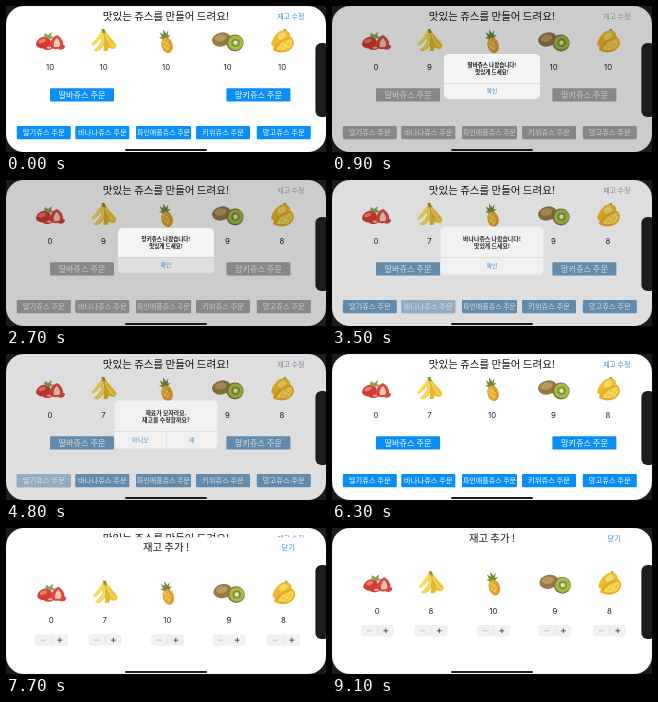
An HTML page with a canvas that plays this animation: 320x146 px, repeating every 9.2 s.

```html
<!DOCTYPE html>
<html lang="ko">
<head>
<meta charset="utf-8">
<style>
html, body { margin: 0; width: 100%; height: 100%; overflow: hidden; background: #fff; }
canvas { display: block; width: 100%; height: 100%; }
</style>
</head>
<body>
<canvas></canvas>
<script>
const W = 320, H = 146, LOOP = 9200, STEP = 100;
const canvas = document.querySelector('canvas');
const ctx = canvas.getContext('2d');
const ratio = window.devicePixelRatio || 1;
canvas.width = W * ratio;
canvas.height = H * ratio;

const FONT = '"Noto Sans CJK KR", "Noto Sans CJK", "Noto Sans", sans-serif';
const DIGITS = 'Inter, sans-serif';
const BLUE = [8, 142, 250], LINK = [64, 140, 205], GREY = [168, 168, 168];
const BUTTON_H = 13.3;
const COLUMNS = [44, 97.5, 160, 221.5, 276];
const BUTTONS = [
  { name: '딸바쥬스', x: 44, y: 82.3, w: 64, size: 8.2 },
  { name: '망키쥬스', x: 220.4, y: 82.3, w: 64, size: 8.2 },
  { name: '딸기쥬스', x: 10.8, y: 119.9, w: 54, size: 7.3 },
  { name: '바나나쥬스', x: 69.3, y: 119.9, w: 54, size: 7.3 },
  { name: '파인애플쥬스', x: 130, y: 119.9, w: 55, size: 7 },
  { name: '키위쥬스', x: 190, y: 119.9, w: 54, size: 7.3 },
  { name: '망고쥬스', x: 250.8, y: 119.9, w: 54, size: 7.3 }
];

const served = name => ({ lines: [name + ' 나왔습니다!', '맛있게 드세요!'], choices: ['확인'] });
const lacking = { lines: ['재료가 모자라요.', '재고를 수정할까요?'], choices: ['아니오', '예'] };
const ALERTS = [
  { button: 0, open: 300, close: 1300, ...served('딸바쥬스') },
  { button: 1, open: 2100, close: 2800, ...served('망키쥬스') },
  { button: 3, open: 3300, close: 4100, ...served('바나나쥬스') },
  { button: 2, open: 4600, close: 5500, pick: 0, ...lacking },
  { button: 2, open: 6500, close: 7200, pick: 1, ...lacking }
];
const SHEET_OPEN = 7400, ADD_BANANA = 8600;

const clamp = v => Math.max(0, Math.min(1, v));
const progress = (t, start, length) => clamp((t - start) / length);
const easeOut = (p, power = 2) => 1 - (1 - p) ** power;
const mix = (a, b, k) => `rgb(${a.map((v, i) => Math.round(v + (b[i] - v) * k))})`;

function text(str, x, y, size, color, weight = 400, font = FONT) {
  ctx.font = `${weight} ${size}px ${font}`;
  ctx.textAlign = 'center';
  ctx.textBaseline = 'alphabetic';
  ctx.fillStyle = color;
  ctx.fillText(str, x, y + size * 0.36);
}

function box(x, y, w, h, r, color) {
  ctx.beginPath();
  ctx.roundRect(x, y, w, h, r);
  ctx.fillStyle = color;
  ctx.fill();
}

function oval(x, y, rx, ry, color, turn = 0) {
  ctx.beginPath();
  ctx.ellipse(x, y, rx, ry, turn, 0, Math.PI * 2);
  ctx.fillStyle = color;
  ctx.fill();
}

function shape(path, color) {
  ctx.fillStyle = color;
  ctx.fill(new Path2D(path));
}

function line(path, color, width) {
  ctx.strokeStyle = color;
  ctx.lineWidth = width;
  ctx.stroke(new Path2D(path));
}

function strawberries() {
  shape('M-14 4C-14-1-9-5-4-4C0-3 2 1 0 4C-4 8-11 9-14 4Z', '#d43a30');
  oval(-8, 0, 4, 2, '#ec7a66', -0.4);
  shape('M-6-5L-5-8L-2-6L2-9L1-5L4-4L0-2L-4-3Z', '#8aa350');
  shape('M0 6C-1 1 2-4 7-6C11-4 14 1 13 5C9 9 3 9 0 6Z', '#dc4a3e');
  shape('M4 6C3 2 5-2 7-3C10 0 11 4 9 6Z', '#f7cabc');
  shape('M-7 8C-6 4 0 3 3 5C3 9-3 10-7 8Z', '#d23b30');
  oval(-1, 6.6, 2.4, 1.1, '#f3b4a4', -0.1);
  shape('M8 8C9 4 14 3 15 5C15 8 11 10 8 8Z', '#d5483c');
}

function bananas() {
  shape('M-2-10L2-10C4-5 11-1 13 5L11 8C4 8-3 2-3-6Z', '#eec434');
  shape('M-2-10L1-9C-1-4-5 2-11 5L-12 3C-9-1-5-5-2-10Z', '#f7dc5c');
  shape('M-1-8C-1-1-4 5-10 9L-7 10.5C0 8 3 2 2-7Z', '#f3d044');
  shape('M0-8C0 0 1 5 0 10L4 10C7 5 5-2 2-8Z', '#e5b72c');
  line('M2-7C4 0 8 4 11 6M0-5C0 2-3 6-7 9', '#faea94', 1);
  shape('M-2-12L1-12L2-8L-1-8Z', '#9b8836');
}

function pineapple() {
  ctx.rotate(-0.25);
  shape('M-2-2L-6-5L-3-5L-4-10L-1-7L0-12L2-7L5-10L3-5L6-5L2-2Z', '#71893c');
  oval(0, 4.4, 5.6, 8, '#e5a332');
  oval(-1, 3.6, 3.3, 5.8, '#f5c44e');
  line('M-5 0L4 9M-3-3L5 5M-5 5L1 12M5 0L-4 9M3-3L-5 5M5 6L0 12', '#c68b2b', 0.5);
}

function kiwis() {
  oval(-6, -1.5, 9.5, 7, '#957842', -0.2);
  oval(-7, -3, 6, 3.5, '#b89a60', -0.2);
  oval(7.5, 2, 8.6, 8.4, '#8a6d3a');
  oval(8, 1.8, 7.5, 7.3, '#a5bd48');
  oval(8, 1.8, 4.4, 4.2, '#7a942f');
  oval(8, 1.8, 2.2, 2.2, '#e9ebbb');
}

function mangoes() {
  shape('M-11 3C-10-3-4-11 3-11C9-10 10-3 6 2C1 7-8 9-11 3Z', '#eebb30');
  oval(0, -5, 4.5, 3, '#f8da68', -0.6);
  shape('M-9 9C-9 3 1-4 9-4C14 0 12 7 6 10C2 12-4 12-9 9Z', '#e7ab22');
  shape('M-5 9C-5 4 3-1 9-2C12 2 9 7 5 9Z', '#fadc58');
  line('M-2 9L5-1M3 9L9 0M-3 4L6 8M1 1L9 5', '#dda62a', 0.5);
  shape('M1-12L4-12L4-10Z', '#8d8a3d');
}

const FRUITS = [strawberries, bananas, pineapple, kiwis, mangoes];

function stock(t) {
  const banana = t < 300 ? 10 : t < 3300 ? 9 : t < ADD_BANANA ? 7 : 8;
  const mixed = t >= 2100;
  return [t < 300 ? 10 : 0, banana, 10, mixed ? 9 : 10, mixed ? 8 : 10];
}

function drawFruits(t, dx, fruitY, countY) {
  const counts = stock(t);
  FRUITS.forEach((draw, i) => {
    const x = COLUMNS[i] + dx;
    ctx.save();
    ctx.translate(x, fruitY);
    draw();
    ctx.restore();
    text(counts[i], x, countY, 7.8, '#222', 400, DIGITS);
  });
}

function drawMain(t, fade) {
  box(0, 0, W, H, 0, '#fff');
  text('맛있는 쥬스를 만들어 드려요!', 160, 10, 10.5, '#111');
  text('재고 수정', 284.8, 10, 7, mix(LINK, GREY, fade));
  drawFruits(t, 0, 35, 61);
  BUTTONS.forEach((b, i) => {
    const pressed = ALERTS.some(a => a.button === i && t >= a.open - 100 && t < a.open + 300);
    box(b.x, b.y, b.w, BUTTON_H, 1.2, mix(BLUE, GREY, fade));
    text(b.name + ' 주문', b.x + b.w / 2, b.y + BUTTON_H / 2, b.size, '#fff');
    if (pressed) box(b.x, b.y, b.w, BUTTON_H, 1.2, 'rgba(255,255,255,.4)');
  });
  if (fade) box(0, 0, W, H, 0, `rgba(0,0,0,${0.2 * fade})`);
}

function drawAlert(alert, t, shown, scale) {
  const x = 112, y = 48, w = 96, h = 45, split = 29;
  const cell = w / alert.choices.length;
  const held = t >= alert.close - 200 ? alert.pick || 0 : -1;
  ctx.save();
  ctx.globalAlpha = shown;
  ctx.translate(160, 70.5);
  ctx.scale(scale, scale);
  ctx.translate(-160, -70.5);
  box(x, y, w, h, 4.5, '#f4f4f4');
  if (held >= 0) {
    const last = held === alert.choices.length - 1;
    box(x + held * cell, y + split, cell, h - split, [0, 0, last ? 4.5 : 0, held ? 0 : 4.5], '#dedede');
  }
  alert.lines.forEach((s, i) => text(s, 160, 59.2 + i * 7.2, 5.5, '#111', 700));
  box(x, y + split, w, 0.4, 0, '#c8c8c8');
  alert.choices.forEach((s, i) => {
    if (i) box(x + i * cell, y + split, 0.4, h - split, 0, '#c8c8c8');
    text(s, x + (i + 0.5) * cell, 85, 5.7, '#2c80d2');
  });
  ctx.restore();
}

function drawSheet(t) {
  const top = H * (1 - easeOut(progress(t, SHEET_OPEN, 500), 3));
  ctx.save();
  ctx.translate(0, top);
  box(0, 0, W, H, 0, '#fff');
  text('재고 추가 !', 160, 10.4, 10.4, '#111');
  text('닫기', 282.2, 10.3, 7.2, mix(LINK, GREY, 0));
  drawFruits(t, 1.3, 55.3, 83.3);
  COLUMNS.forEach((c, i) => {
    const x = c + 1;
    const held = i === 1 && t >= ADD_BANANA - 100 && t < ADD_BANANA + 200;
    box(x - 16, 97, 33, 11.5, 3, '#f1f1f2');
    if (held) box(x + 0.5, 97, 16.5, 11.5, 3, '#dcdcde');
    box(x + 0.3, 99.5, 0.5, 6.5, 0, '#d6d6d8');
    line(`M${x - 10.3} 102.8h5`, '#aaa', 0.7);
    line(`M${x + 6.4} 102.8h4.8M${x + 8.8} 100.4v4.8`, '#333', 0.8);
  });
  ctx.restore();
}

function drawDevice() {
  ctx.beginPath();
  ctx.rect(0, 0, W, H);
  ctx.roundRect(0, 0, W, H, 18);
  ctx.fillStyle = '#1c1c1c';
  ctx.fill('evenodd');
  box(309.4, 37, 14, 74, 6, '#1c1c1c');
  box(119, 143, 82, 2, 1, '#1c1c1c');
}

function draw(t) {
  ctx.setTransform(canvas.width / W, 0, 0, canvas.height / H, 0, 0);
  const alert = ALERTS.find(a => t >= a.open && t < a.close + 300);
  const enter = alert ? easeOut(progress(t, alert.open, 500)) : 0;
  const leave = alert ? progress(t, alert.close, 300) : 0;
  const fade = enter * (1 - leave);
  drawMain(t, fade);
  if (alert) drawAlert(alert, t, Math.min(1, enter * 1.4) * (1 - leave), 1.2 - 0.2 * enter);
  if (t >= SHEET_OPEN) drawSheet(t);
  drawDevice();
}

function tick() {
  const t = performance.now() % LOOP;
  draw(Math.floor(t / STEP) * STEP);
  requestAnimationFrame(tick);
}
tick();
</script>
</body>
</html>
```
